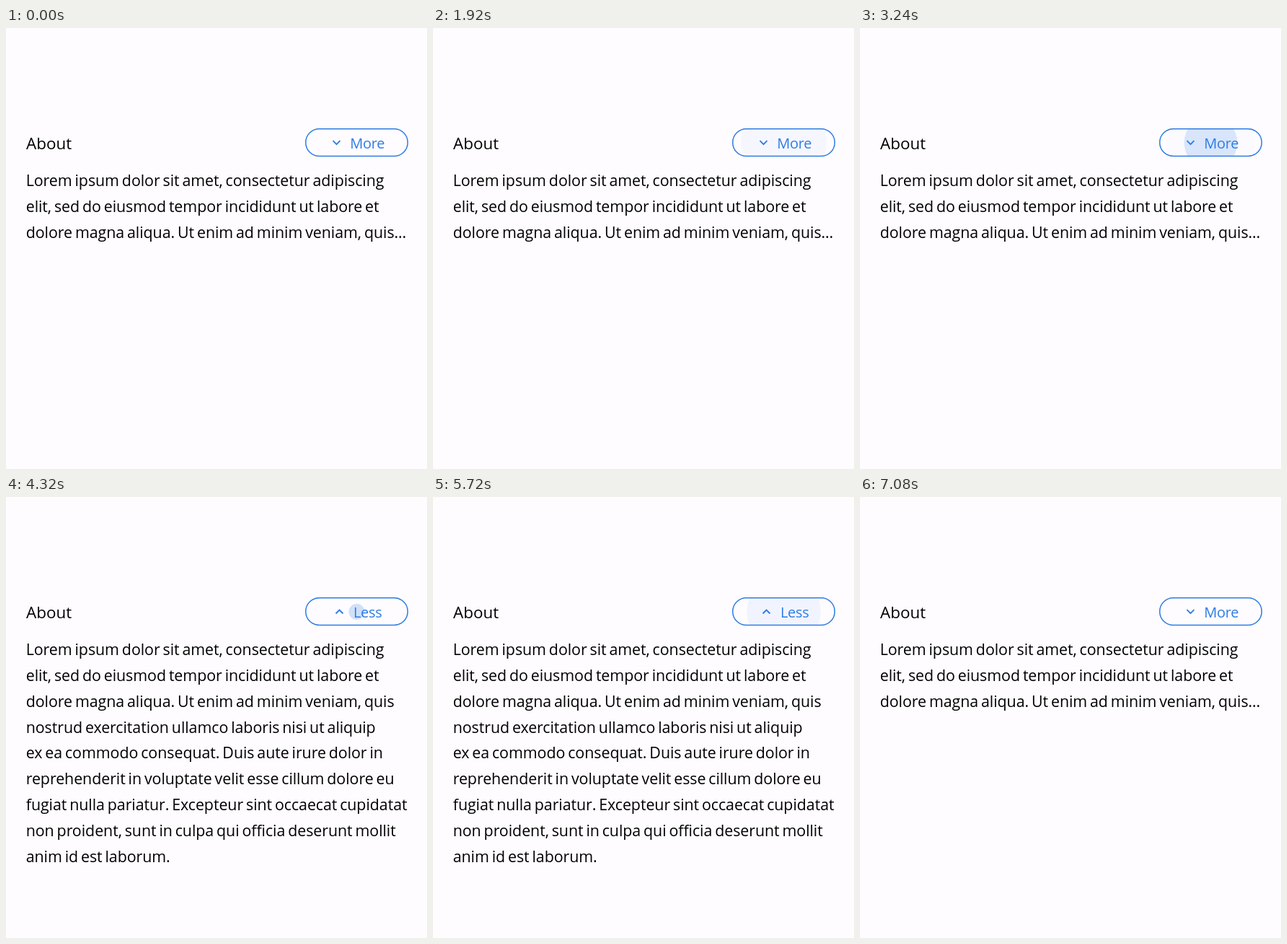
Animation, 584 px wide and 611 px high, one loop 7.32 s. Source, as an HTML page:

```html
<!DOCTYPE html>
<html lang="en">
<head>
<meta charset="utf-8">
<title>Expandable text</title>
<style>
  html, body { margin: 0; width: 100%; height: 100%; overflow: hidden; background: #fefcff; }
  svg { display: block; font-family: "Open Sans", "Noto Sans", sans-serif; }
  .body { font-size: 21.4px; letter-spacing: -0.06px; word-spacing: -1.6px; }
  .title { font-size: 22.4px; }
  .label { font-size: 20px; letter-spacing: -0.3px; fill: #2e7de3; }
  .line { fill: none; stroke: #2e7de3; }
</style>
</head>
<body>
<svg width="584" height="611" viewBox="0 0 584 611">
  <defs>
    <clipPath id="pill"><rect x="415" y="139" width="143" height="39" rx="19.5"/></clipPath>
  </defs>
  <text class="title" x="28" y="168">About</text>
  <g id="ripples" clip-path="url(#pill)" fill="#2e7de3"></g>
  <rect class="line" x="415.75" y="139.75" width="141.5" height="37.8" rx="18.9" stroke-width="1.5"/>
  <path class="line" id="chevron" stroke-width="1.9"/>
  <text class="label" id="label" y="167"></text>
  <g class="body" id="lines"></g>
</svg>
<script>
const LOOP = 7320;
const COLLAPSED_LINES = 3;
const FADE_END = 520;
// Each tap: press time and release time in ms; the release toggles the text.
const TAPS = [
  [760, 870], [1520, 1680], [2640, 2700], [2820, 2880],
  [3080, 3270], [4284, 4420], [5440, 5560], [5863, 5980]
];
const TEXT = [
  "Lorem ipsum dolor sit amet, consectetur adipiscing",
  "elit, sed do eiusmod tempor incididunt ut labore et",
  "dolore magna aliqua. Ut enim ad minim veniam, quis",
  "nostrud exercitation ullamco laboris nisi ut aliquip",
  "ex ea commodo consequat. Duis aute irure dolor in",
  "reprehenderit in voluptate velit esse cillum dolore eu",
  "fugiat nulla pariatur. Excepteur sint occaecat cupidatat",
  "non proident, sunt in culpa qui officia deserunt mollit",
  "anim id est laborum."
];

const byId = id => document.getElementById(id);

function add(parent, tag, attributes) {
  const node = document.createElementNS("http://www.w3.org/2000/svg", tag);
  for (const name in attributes) node.setAttribute(name, attributes[name]);
  return parent.appendChild(node);
}

const lines = TEXT.map((text, i) => {
  const line = add(byId("lines"), "text", { x: 27.7, y: 219 + i * 35.85 });
  line.textContent = text;
  return line;
});
const ripples = TAPS.map(() => add(byId("ripples"), "circle", { cx: 486.5, cy: 159 }));

function showState(expanded) {
  lines.forEach((line, i) => {
    line.style.display = expanded || i < COLLAPSED_LINES ? "" : "none";
  });
  const last = COLLAPSED_LINES - 1;
  lines[last].textContent = TEXT[last] + (expanded ? "" : "…");
  byId("label").textContent = expanded ? "Less" : "More";
  byId("label").setAttribute("x", expanded ? 482 : 477.2);
  byId("chevron").setAttribute("d", expanded ? "M457.5 161.5l5-5 5 5" : "M453.5 156.2l5 5 5-5");
}

function drawRipple(circle, t, [press, release]) {
  const age = t - press;
  const released = Math.max(0, t - release);
  const visible = age >= 0 && released < FADE_END;
  circle.setAttribute("r", visible ? 71 * (1 - Math.exp(-age / 220)) : 0);
  const strength = 0.155 + 0.12 * Math.exp(-Math.max(0, age) / 60);
  circle.setAttribute("opacity", strength * Math.exp(-released / 160));
}

let shown = null;
function draw(now) {
  const t = now % LOOP;
  const expanded = TAPS.filter(tap => t >= tap[1]).length % 2 === 1;
  if (expanded !== shown) showState(shown = expanded);
  ripples.forEach((circle, i) => drawRipple(circle, t, TAPS[i]));
}

const start = performance.now();
function tick() {
  draw(performance.now() - start);
  requestAnimationFrame(tick);
}
tick();
</script>
</body>
</html>
```
